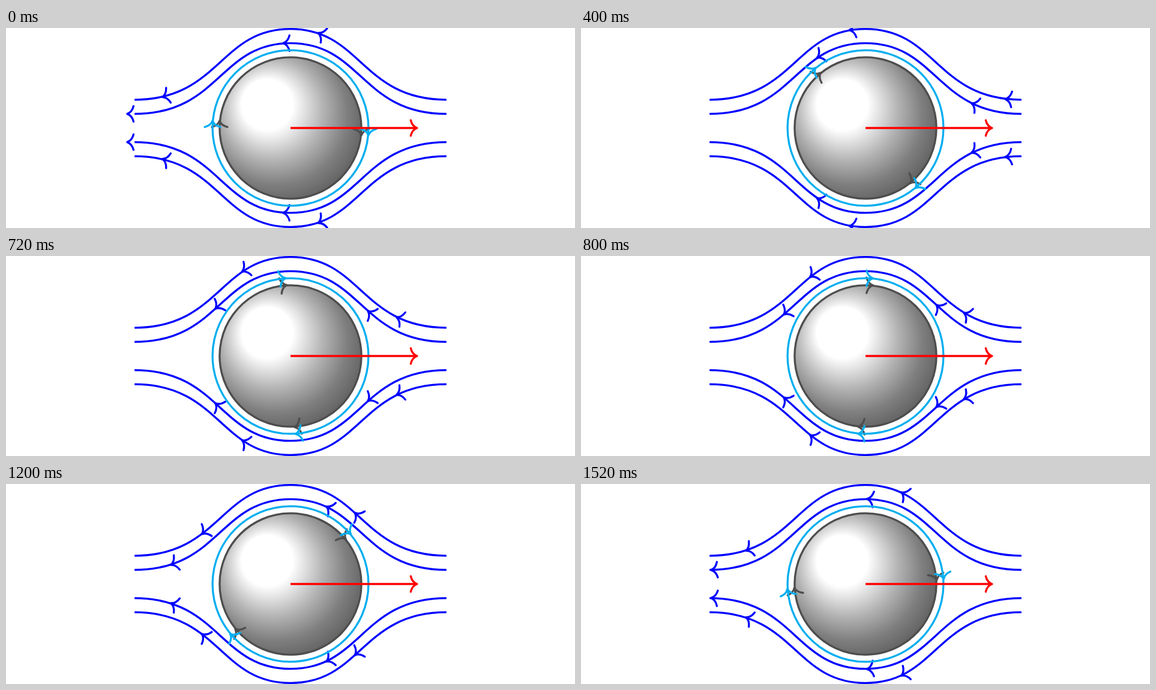
An HTML page for the animation above (1.6 s loop, 948 by 334 pixels).

```html
<!DOCTYPE html>
<html lang="en">
<head>
<meta charset="utf-8">
<title>Flow around a spinning sphere</title>
<style>
  html, body { margin: 0; width: 100%; height: 100%; overflow: hidden; background: #fff; }
  svg { display: block; width: 948px; height: 334px; }
  .line { fill: none; stroke-width: 3.32; }
  .flow { stroke: #00f; }
  .rim { stroke: #4d4d4d; }
  .layer { stroke: #00aeef; }
  .push { stroke: #f00; }
</style>
</head>
<body>
<svg viewBox="0 0 948 334">
  <defs>
    <radialGradient id="ball" gradientUnits="userSpaceOnUse" cx="0" cy="0" r="236.2" fx="-47.2" fy="-47.2">
      <stop offset="0" stop-color="#fff"/>
      <stop offset=".18" stop-color="#fff"/>
      <stop offset=".36" stop-color="#b3b3b3"/>
      <stop offset=".5" stop-color="#7f7f7f"/>
      <stop offset="1" stop-color="#000"/>
    </radialGradient>
    <!-- open arrowhead pointing along +x, back edge at the origin -->
    <path id="head" stroke-linecap="round" stroke-linejoin="round"
      d="M1.7 -13C3.65 -5.2 8 -1.5 12.3 0C8 1.5 3.65 5.2 1.7 13"/>
    <path id="stream" d="M259.8 -23.6C118.1 -23.6 118.1 -141.7 0 -141.7S-118.1 -23.6 -259.8 -23.6"/>
    <g id="inner">
      <use href="#stream"/>
      <use href="#head" data-lag="0" data-half="0"/>
      <use href="#head" data-lag="0" data-half="1"/>
    </g>
    <g id="outer">
      <use href="#stream"/>
      <use href="#head" data-lag="4" data-half="0"/>
      <use href="#head" data-lag="4" data-half="1"/>
    </g>
    <g id="side">
      <use href="#inner"/>
      <use href="#outer" y="-23.6"/>
    </g>
  </defs>

  <g class="line" transform="translate(474 167)">
    <g class="flow">
      <use href="#side"/>
      <use href="#side" transform="scale(1 -1)"/>
    </g>
    <circle r="118.1" fill="url(#ball)"/>
    <g class="rim spin">
      <circle r="118.1"/>
      <use href="#head" transform="translate(-118.1) rotate(-90)"/>
      <use href="#head" transform="translate(118.1) rotate(90)"/>
    </g>
    <g class="layer spin">
      <circle r="129.9"/>
      <use href="#head" transform="translate(-129.9) rotate(-90)"/>
      <use href="#head" transform="translate(129.9) rotate(90)"/>
    </g>
    <g class="push">
      <path d="M0 0H210.5"/>
      <use href="#head" transform="translate(198.6)"/>
    </g>
  </g>
</svg>
<script>
  const STEPS = 20, STEP_MS = 80;
  const stream = document.getElementById('stream');
  const total = stream.getTotalLength();
  const heads = document.querySelectorAll('[data-lag]');
  const spins = document.querySelectorAll('.spin');

  // Transform that sets an arrowhead on the stream at arc length s.
  function place(s) {
    const p = stream.getPointAtLength(s);
    const a = stream.getPointAtLength(Math.max(0, s - 0.5));
    const b = stream.getPointAtLength(Math.min(total, s + 0.5));
    const angle = Math.atan2(b.y - a.y, b.x - a.x) * 180 / Math.PI;
    return `translate(${p.x} ${p.y}) rotate(${angle})`;
  }

  function draw(step) {
    for (const head of heads) {
      // Runs 1..STEPS, so a head shows at the far end and never at the start.
      const n = (step - head.dataset.lag + STEPS - 1) % STEPS + 1;
      const part = (n / STEPS + Number(head.dataset.half)) / 2;
      head.setAttribute('transform', place(part * total));
    }
    for (const spin of spins) {
      spin.setAttribute('transform', `rotate(${step * 180 / STEPS})`);
    }
  }

  let shown = -1;
  function tick(now) {
    const step = Math.floor(now / STEP_MS) % STEPS;
    if (step !== shown) draw(shown = step);
    requestAnimationFrame(tick);
  }
  draw(0);
  requestAnimationFrame(tick);
</script>
</body>
</html>
```
